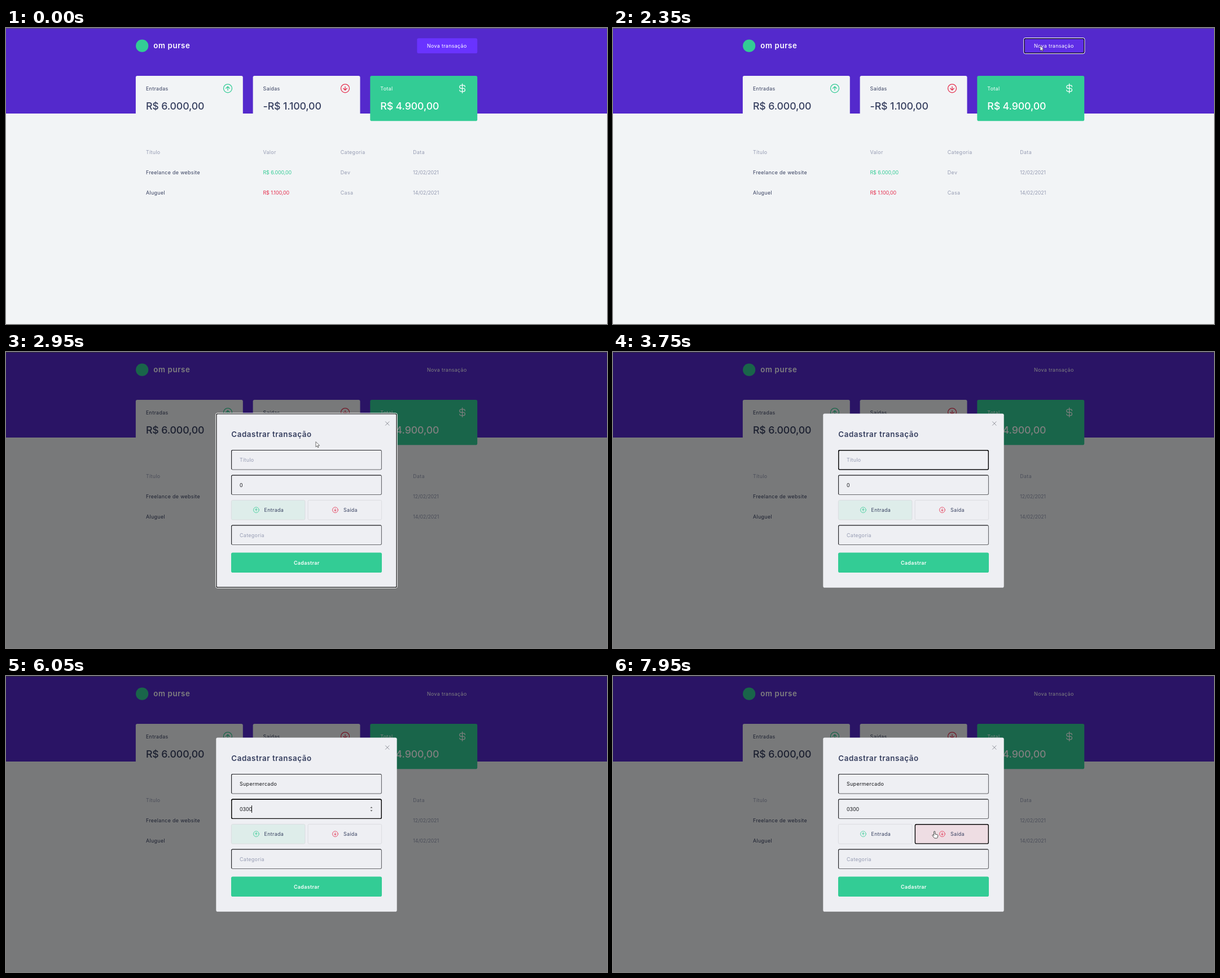
These frames come from a looping animation (1065 by 526 pixels, 8 s). An HTML page:

```html
<!DOCTYPE html>
<html lang="pt-BR">
<head>
<meta charset="utf-8">
<title>Nova transação</title>
<style>
  html, body { margin: 0; width: 100%; height: 100%; overflow: hidden; background: #f2f4f6; }
  svg { display: block; width: 100vw; height: 100vh; }
  text { font: 400 8.9px Inter, sans-serif; letter-spacing: .038em; fill: #363f5f; white-space: pre; }
  .muted { fill: #969cb3; }
  .num { letter-spacing: -.01em; }
  .big { font-size: 17.8px; font-weight: 500; letter-spacing: -.008em; }
  .brand, .heading { font-size: 13.35px; font-weight: 600; letter-spacing: .043em; }
  .strong { font-weight: 600; letter-spacing: .043em; }
  .white { fill: #fff; }
  .green { fill: #33cc95; }
  .red { fill: #e52e4d; }
  .typed { fill: #15161a; }
  .line { fill: none; stroke-linecap: round; stroke-linejoin: round; }
</style>
</head>
<body>
<svg id="stage" viewBox="0 0 1065 526" preserveAspectRatio="none"></svg>
<script>
const DURATION = 8000;
const GREEN = '#33cc95', RED = '#e52e4d', PAGE = '#f2f4f6', MODAL = '#eeeff3';
const FIELD = { x: 399, w: 267, h: 35.6 };
const ROWS = [174, 218.5, 263, 307.5];
const CHOICE = { w: 131.3, left: 399, right: 534.7 };
const svg = document.getElementById('stage');

const text = (x, y, content, cls = '', extra = '') =>
  `<text x="${x}" y="${y}" class="${cls}" ${extra}>${content}</text>`;
const rect = (x, y, w, h, fill, extra = '') =>
  `<rect x="${x}" y="${y}" width="${w}" height="${h}" fill="${fill}" ${extra}/>`;
const round = 'rx="2.8"';

// Rectangle whose stroke lies inside its bounds.
const framed = (x, y, w, h, fill, stroke, width, extra = '') =>
  rect(x + width / 2, y + width / 2, w - width, h - width, fill,
    `rx="2.2" stroke="${stroke}" stroke-width="${width}" ${extra}`);

// Circled arrow: dir is -1 for up, 1 for down.
const arrowIcon = (x, y, r, color, dir) => {
  const a = r * .43;
  return `<g class="line" transform="translate(${x} ${y})" stroke="${color}" stroke-width="${r * .17}">
    <circle r="${r}"/><path d="M0 ${-a * dir}V${a * dir}M${-a} 0L0 ${a * dir}L${a} 0"/></g>`;
};

const dollarIcon = (x, y) =>
  `<path class="line" transform="translate(${x} ${y})" stroke="#fff" stroke-width="1.2"
    d="M0-8.3V8.3M4.7-2.7V-3.2A2.3 2.3 0 0 0 2.4-5.5H-2.1A2.7 2.7 0 0 0-2.1 0H2.1A2.7 2.7 0 0 1 2.1 5.5H-2.4A2.3 2.3 0 0 1-4.7 3.2V2.7"/>`;

const card = (x, fill, label, value, icon, cls = '') =>
  rect(x, 85, 189.9, 80.2, fill, round) +
  text(x + 18, 110.8, label, cls) + text(x + 18, 145, value, 'big ' + cls) + icon;

const row = (y, cells, classes) =>
  cells.map((cell, i) => text([248, 455.5, 592.8, 721.3][i], y, cell, classes[i])).join('');

const focusRing = (id, x, y, w) =>
  framed(x, y, w, FIELD.h, 'none', '#080808', 1.4, `id="${id}"`);

const field = y => {
  const { x, w, h } = FIELD;
  return framed(x, y, w, h, MODAL, '#66676b', 1.1, 'class="fieldFill"') +
    `<path class="line" stroke="#222327" stroke-width="1.1"
      d="M${x + .55} ${y + h - 2}V${y + 2.4}Q${x + .55} ${y + .55} ${x + 2.4} ${y + .55}H${x + w - 2}"/>`;
};

const typeButton = (id, x, label, labelX, icon) =>
  framed(x, ROWS[2], CHOICE.w, FIELD.h, MODAL, '#d7d8dc', .8, `id="${id}"`) +
  icon + text(labelX, 284, label);

const outline = (x, y, w, h) =>
  rect(x - .7, y - .7, w + 1.4, h + 1.4, 'none', 'rx="3" stroke="#fff" stroke-width="1"') +
  framed(x, y, w, h, 'none', '#101010', 1.2);

const page =
  rect(0, 0, 1065, 526, PAGE) + rect(0, 0, 1065, 152, '#5429cc') + rect(0, 0, 1065, 1, '#5d5474') +
  `<circle cx="241.2" cy="31.7" r="11.1" fill="${GREEN}"/>` + text(261.3, 36.2, 'om purse', 'brand white') +
  rect(728.4, 18.2, 106.8, 26.8, '#6933ff', `id="newButton" ${round}`) +
  text(746, 35, 'Nova transação', 'white') +
  `<g id="buttonRing">${outline(728.4, 18.2, 106.8, 26.8)}</g>` +
  card(229.9, PAGE, 'Entradas', 'R$ 6.000,00', arrowIcon(393, 107.3, 7.5, GREEN, -1)) +
  card(437.6, PAGE, 'Saídas', '-R$ 1.100,00', arrowIcon(601, 107.3, 7.5, RED, 1)) +
  card(645.3, GREEN, 'Total', 'R$ 4.900,00', dollarIcon(808.6, 107.3), 'white') +
  row(223.8, ['Título', 'Valor', 'Categoria', 'Data'], Array(4).fill('muted')) +
  row(260, ['Freelance de website', 'R$ 6.000,00', 'Dev', '12/02/2021'], ['', 'num green', 'muted', 'num muted']) +
  row(296.2, ['Aluguel', 'R$ 1.100,00', 'Casa', '14/02/2021'], ['', 'num red', 'muted', 'num muted']);

const modal =
  rect(0, 0, 1065, 526, '#000', 'opacity=".5"') +
  rect(372.3, 109.4, 320.4, 309.3, MODAL, `id="panel" ${round}`) +
  `<g id="panelRing">${outline(372.3, 109.4, 320.4, 309.3)}</g>` +
  text(399.3, 150.8, 'Cadastrar transação', 'heading') +
  '<path id="close" class="line" stroke="#8f9199" stroke-width="1" d="M672.5 123.8L679 130.3M679 123.8L672.5 130.3"/>' +
  [ROWS[0], ROWS[1], ROWS[3]].map(field).join('') +
  text(414, 195, 'Título', 'muted', 'id="titleText"') +
  text(414, 239.5, '0', 'num typed', 'id="valueText"') +
  text(414, 328.6, 'Categoria', 'muted') +
  '<path id="spinner" fill="#444" d="M645.5 234.6L647.5 232.4L649.5 234.6ZM645.5 238.4L647.5 240.6L649.5 238.4Z"/>' +
  typeButton('incomeButton', CHOICE.left, 'Entrada', 457.5, `<g id="incomeIcon">${arrowIcon(443.4, 280.7, 4.9, GREEN, -1)}</g>`) +
  typeButton('outcomeButton', CHOICE.right, 'Saída', 598, `<g id="outcomeIcon">${arrowIcon(583.4, 280.7, 4.9, RED, 1)}</g>`) +
  rect(FIELD.x, 356.4, FIELD.w, FIELD.h, GREEN, round) +
  text(532.8, 377.6, 'Cadastrar', 'strong white', 'text-anchor="middle"') +
  focusRing('titleRing', FIELD.x, ROWS[0], FIELD.w) +
  focusRing('valueRing', FIELD.x, ROWS[1], FIELD.w) +
  focusRing('incomeRing', CHOICE.left, ROWS[2], CHOICE.w) +
  focusRing('outcomeRing', CHOICE.right, ROWS[2], CHOICE.w) +
  rect(0, 0, 1, 13, '#111', 'id="caret"');

const cursors =
  '<path id="arrow" fill="#fff" stroke="#111" stroke-width=".6" d="M0 0V9.2L2.2 7.2L3.6 10.3L5 9.7L3.6 6.7H6.6Z"/>' +
  '<path id="beam" class="line" stroke="#222" stroke-width=".9" d="M-1.8-5.5H1.8M0-5.5V5.5M-1.8 5.5H1.8"/>' +
  '<path id="dot" fill="#fff" d="M0 0H1.3V1.3H0Z"/>' +
  `<path id="hand" fill="#fff" stroke="#333" stroke-width=".9" stroke-linejoin="round"
    d="M-1.1 1A1.1 1.1 0 0 1 1.1 1V5L4.8 5.8Q6.3 6.2 6.1 7.7L5.5 10.8Q5.2 12.2 3.8 12.2H.8Q-.2 12.2-.8 11.3L-3.7 7.6Q-4.2 6.5-3.3 6.2Q-2.4 6-1.8 6.8L-1.1 7.6Z"/>`;

svg.innerHTML = page + `<g id="modal">${modal}</g>` + cursors;

const el = {};
svg.querySelectorAll('[id]').forEach(node => el[node.id] = node);
const fieldFills = svg.querySelectorAll('.fieldFill');

const between = (t, a, b) => t >= a && t < b;
const show = (name, on) => { el[name].style.display = on ? '' : 'none'; };
const fill = (name, color) => el[name].setAttribute('fill', color);
const progress = (t, a, b) => Math.min(1, Math.max(0, (t - a) / (b - a)));

// Latest value in a list of [start, value] pairs.
const latest = (t, steps) => steps.reduce((value, [start, next]) => t >= start ? next : value, steps[0][1]);

const POINTER = [
  [1050, 742, 1], [1300, 286, 286], [1450, 286, 286], [1500, 270, 284], [1650, 742, 27],
  [1750, 742, 27], [2000, 757, 31.5], [2550, 757, 31.5], [3050, 497, 191.5],
  [7250, 497, 252.5], [7300, 507, 258], [7550, 569.7, 276]
];

function pointerAt(t) {
  const i = POINTER.findIndex(([time]) => time > t);
  if (i < 0) return POINTER[POINTER.length - 1].slice(1);
  if (i === 0) return POINTER[0].slice(1);
  const [t0, x0, y0] = POINTER[i - 1], [t1, x1, y1] = POINTER[i];
  const p = progress(t, t0, t1);
  return [x0 + (x1 - x0) * p, y0 + (y1 - y0) * p];
}

function drawPointer(t) {
  const [x, y] = pointerAt(t);
  const kind = latest(t, [[0, ''], [1050, 'arrow'], [3000, 'beam'], [3750, ''], [7250, 'dot'], [7300, 'hand']]);
  for (const name of ['arrow', 'beam', 'dot', 'hand']) {
    show(name, name === kind);
    el[name].setAttribute('transform', `translate(${x} ${y})`);
  }
}

function drawTyping(t) {
  const title = latest(t, [[0, ''], [3850, 'Supermerc'], [4100, 'Supermercado']]);
  el.titleText.textContent = title || 'Título';
  el.titleText.setAttribute('class', title ? 'typed' : 'muted');
  el.valueText.textContent = latest(t, [[0, '0'], [5650, '03'], [5950, '030'], [6050, '0300']]);

  const inTitle = between(t, 3350, 3750) || between(t, 3850, 4300);
  const inValue = between(t, 4600, 5050) || between(t, 5300, 6300);
  show('caret', inTitle || inValue);
  if (!inTitle && !inValue) return;
  const node = inTitle ? el.titleText : el.valueText;
  const width = inTitle && !title ? 0 : node.getComputedTextLength();
  el.caret.setAttribute('x', Math.round(414 + width - .5));
  el.caret.setAttribute('y', inTitle ? 185 : 230);
}

function render(time) {
  const t = Math.floor(time / 50) * 50;
  const hover = progress(t, 1750, 2000);
  const channel = (from, to) => Math.round(from + (to - from) * hover);
  fill('newButton', `rgb(${channel(105, 95)},${channel(51, 46)},${channel(255, 230)})`);
  show('newButton', t < 2600);
  show('buttonRing', between(t, 2200, 2400));

  const settled = t >= 2450;
  const panelColor = settled ? MODAL : '#f0f1f5';
  show('modal', t >= 2400);
  show('panelRing', t < 3350);
  fill('panel', panelColor);
  fieldFills.forEach(node => node.setAttribute('fill', settled ? MODAL : '#e7e8ec'));
  for (const name of ['close', 'incomeIcon', 'outcomeIcon']) show(name, settled);

  show('titleRing', between(t, 3350, 4600));
  show('valueRing', between(t, 4600, 6300));
  show('incomeRing', between(t, 6300, 7750));
  show('outcomeRing', t >= 7750);
  show('spinner', between(t, 4300, 7300));
  fill('incomeButton', t < 7950 ? '#deedea' : MODAL);
  fill('outcomeButton', t < 7950 ? panelColor : '#eedde3');

  drawTyping(t);
  drawPointer(t);
}

const start = performance.now();
function tick() {
  render((performance.now() - start) % DURATION);
  requestAnimationFrame(tick);
}
tick();
</script>
</body>
</html>
```
